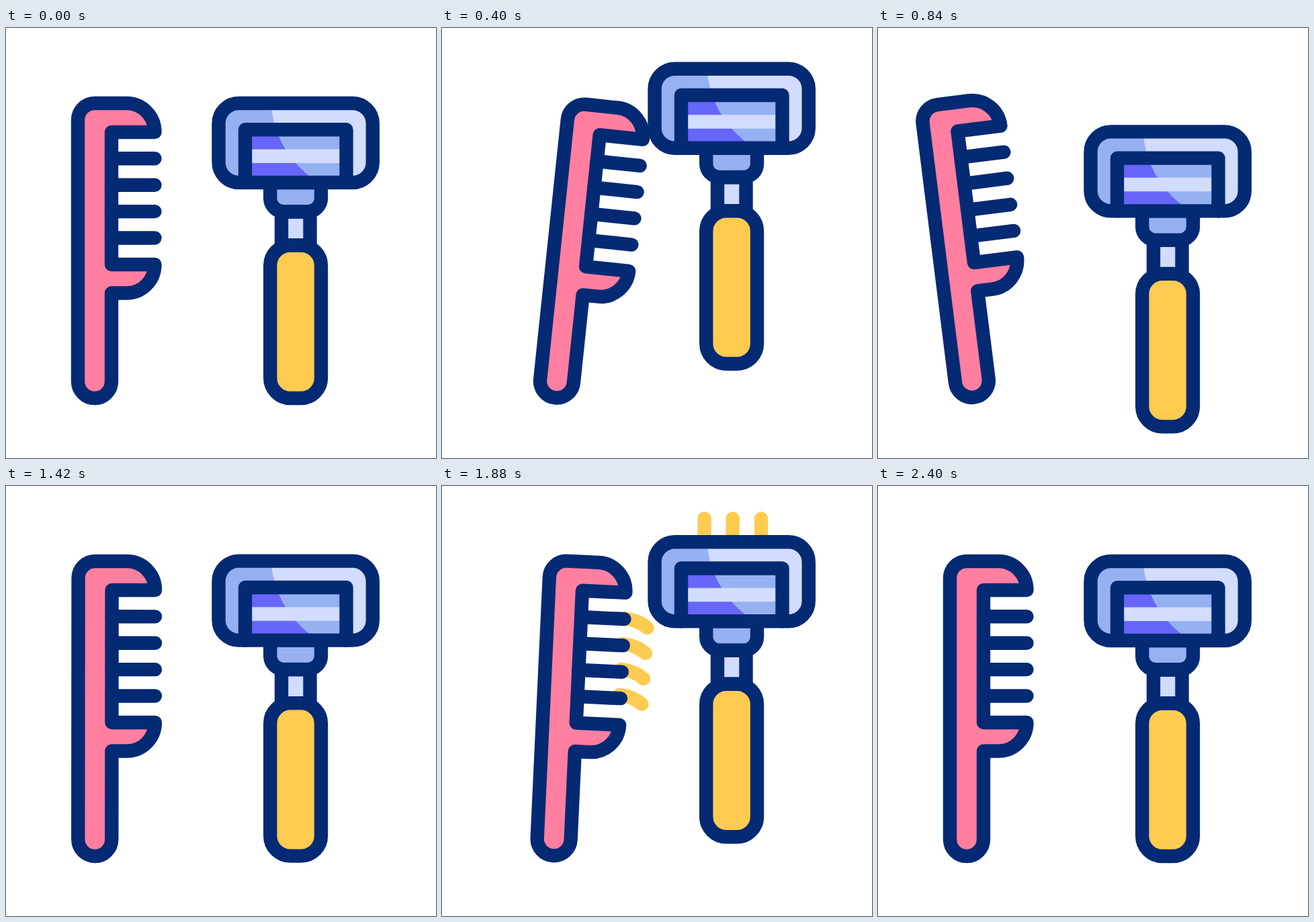
Recreate the animation shown at these times as an HTML page. Size 640 by 640 pixels, loop 2620 ms.

```html
<!DOCTYPE html>
<html>
<head>
<meta charset="utf-8">
<style>
html, body { margin: 0; width: 100%; height: 100%; overflow: hidden; background: #fff; }
svg { display: block; width: 100vw; height: 100vh; }
.ink { stroke: #042a74; stroke-width: 20.4; stroke-linecap: round; stroke-linejoin: round; }
.hair { stroke: #fecb51; stroke-width: 20.4; stroke-linecap: round; fill: none; }
</style>
</head>
<body>
<svg viewBox="0 0 640 640">
  <clipPath id="shine"><circle cx="544" cy="102" r="150"/></clipPath>
  <path id="combHair" class="hair"/>
  <path id="razorHair" class="hair"/>
  <g id="comb" class="ink">
    <path fill="#ff7fa0" d="M107 137a25 25 0 0 1 25-25H179.500a42 43 0 0 1 42 43H157V352H221.500a42 42.500 0 0 1-42 42.500H157V526a25 25 0 0 1-50 0Z"/>
    <path d="M157 194.300h64.500M157 233.700h64.500M157 273.100h64.500M157 312.500h64.500"/>
  </g>
  <g id="razor">
    <path class="ink" fill="#d2dcfe" d="M410 273.500V323.500H452.500V273.500Z"/>
    <path class="ink" fill="#95b1f2" d="M393.200 230V253.300a20 20 0 0 0 20 20H449a20 20 0 0 0 20-20V230Z"/>
    <rect class="ink" fill="#fecb51" x="393.200" y="323.500" width="75.800" height="227.500" rx="30"/>
    <rect fill="#95b1f2" x="316.500" y="112" width="229.300" height="118" rx="30"/>
    <path fill="#6865fa" d="M356 151H506.500V230H356Z"/>
    <g clip-path="url(#shine)">
      <rect fill="#d2dcfe" x="316.500" y="112" width="229.300" height="118" rx="30"/>
      <path fill="#95b1f2" d="M356 151H506.500V230H356Z"/>
    </g>
    <path fill="#d2dcfe" d="M356 180.500H506.500V201H356Z"/>
    <path class="ink" fill="none" d="M356 230V151.300H506.500V230"/>
    <rect class="ink" fill="none" x="316.500" y="112" width="229.300" height="118" rx="30"/>
  </g>
</svg>
<script>
const LOOP = 2620, CYCLE = 1400, STEP = 20;
const el = id => document.getElementById(id);
const clamp = v => Math.max(0, Math.min(1, v));
const mix = (a, b, p) => a + (b - a) * p;
const smooth = p => p * p * (3 - 2 * p);

// Eases from rest to a, on to b, and back to rest.
function swing(t, a, b) {
  if (t < 400) return a * smooth(t / 400);
  if (t < 700) return mix(a, b, smooth((t - 400) / 300));
  return b * (1 - smooth(clamp((t - 700) / 300)));
}

function razorHair(t, p) {
  const top = 37.5 + 0.0025 * (t - 498) ** 2 + 10.2;
  const length = mix(30, 15, p);
  return [390.5, 432.700, 475].map(x => `M${x} ${top}v${length}`).join('');
}

// Strands fly off the tooth tips, then fall back behind them.
function combHair(t, p, dx, dy, angle) {
  const out = clamp((t - 400) / 80);
  const sin = Math.sin(angle), cos = Math.cos(angle);
  let d = '';
  for (let i = 0; i < 4; i++) {
    const tipY = 526 + dy + 89.5 * sin + (39.4 * i - 331.7) * cos;
    const x = 305.500 - 2.7 * i - (119 - 4.5 * i) * ((t - 470) ** 2 - 100) / 44000;
    const y = tipY + out * mix(13 - 1.5 * i, 1 + i, p);
    const sx = x - mix(33, 20, p);
    const sy = y + out * mix(-14, 4, p);
    const cx = (x + sx) / 2 + mix(4, 0, p);
    const cy = (y + sy) / 2 - out * mix(4, 0, p);
    d += `M${sx} ${sy}Q${cx} ${cy} ${x} ${y}`;
  }
  return d;
}

function draw(t) {
  const dx = swing(t, 39, 14.2), dy = swing(t, -0.5, -2), turn = swing(t, 6, -13);
  el('comb').setAttribute('transform', `translate(${dx} ${dy}) rotate(${turn} 132 526)`);
  el('razor').setAttribute('transform', `translate(0 ${swing(t, -51.300, 77)})`);

  const flying = t > 400 && t < 740;
  const p = clamp((t - 480) / 200);
  el('razorHair').setAttribute('d', flying ? razorHair(t, p) : '');
  el('combHair').setAttribute('d', flying ? combHair(t, p, dx, dy, turn * Math.PI / 180) : '');
}

const start = performance.now();
function tick() {
  const t = (performance.now() - start) % LOOP;
  draw(Math.floor(t / STEP) * STEP % CYCLE);
  requestAnimationFrame(tick);
}
tick();
</script>
</body>
</html>
```
